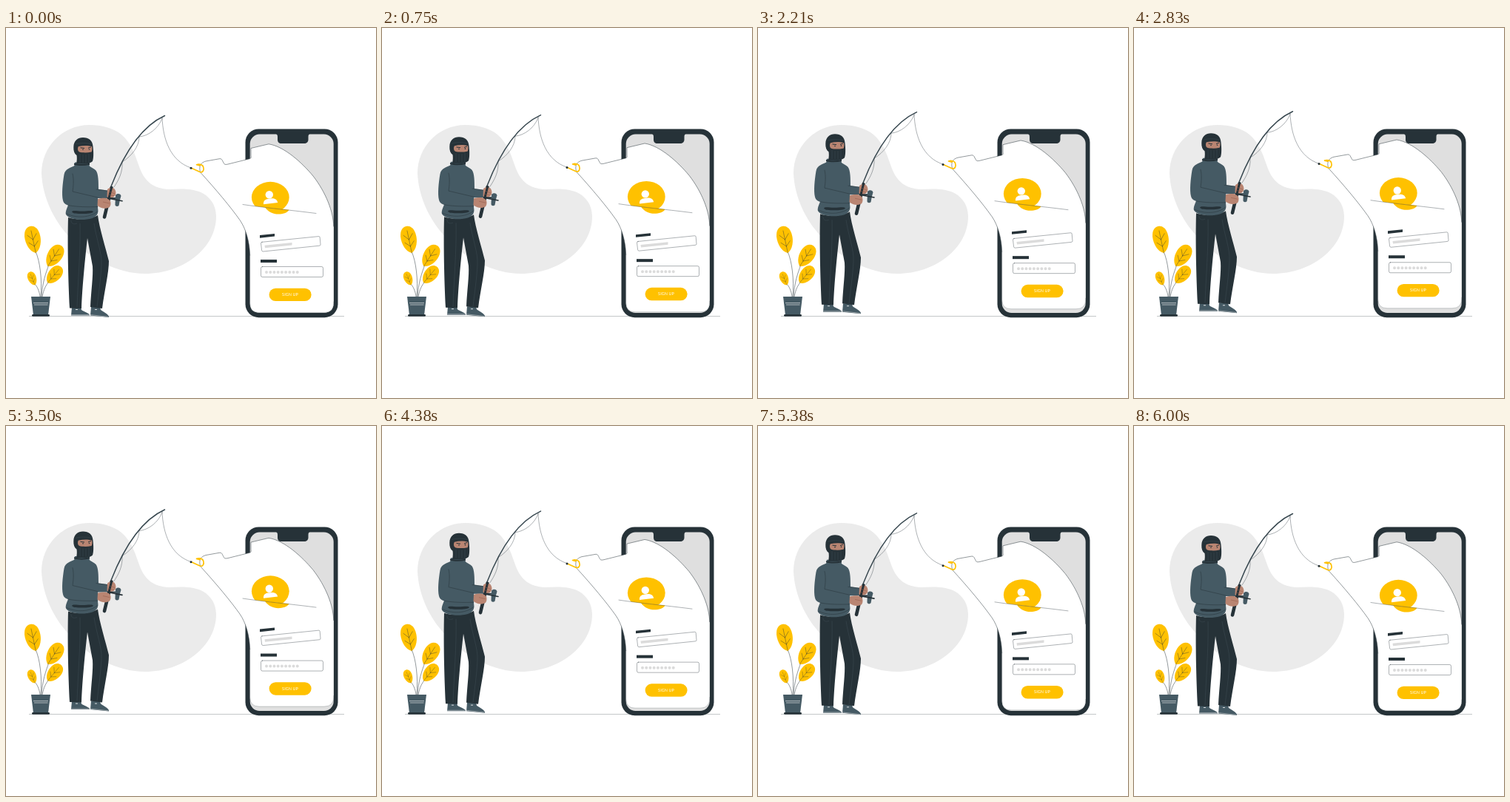
Write an HTML page that moves like this. It is 500 px wide and 500 px high and loops after 6.04 s.

```html
<!DOCTYPE html>
<html lang="en">
<head>
<meta charset="utf-8">
<title>Phishing</title>
<style>
  html, body { margin: 0; width: 100%; height: 100%; overflow: hidden; background: #fff; }
  svg { display: block; width: 100%; height: 100%; }
  .ink { fill: #263238; }
  .slate { fill: #455a64; }
  .gold { fill: #ffc100; }
  .skin { fill: #b98572; }
  .pale { fill: #dbdbdb; }
  .white { fill: #fff; }
  .thin { fill: none; stroke: #263238; stroke-width: .5; stroke-linecap: round; stroke-linejoin: round; }
  .fine { stroke-width: .38; }
  .rib { fill: none; stroke: #46555c; stroke-width: .4; }
  text { font: 5.4px Lato, Inter, sans-serif; letter-spacing: .1px; }
</style>
</head>
<body>
<svg viewBox="0 0 500 500">
  <defs>
    <g id="leaf">
      <path class="gold" d="M0 18C-7 15-11 4-10-6C-9-14-5-18 0-18S9-14 10-6C11 4 7 15 0 18Z"/>
      <path class="thin fine" d="M0 18V-12M0 9L-6 3M0 9L6 3M0 0L-6-7M0 0L6-7"/>
    </g>
    <clipPath id="upper"><path d="M320 200H420V250.500C380 245.500 350 243 320 238.500Z"/></clipPath>
  </defs>

  <path fill="#ebebeb" d="M113 131C75 131 48 162 48 196C49 225 62 258 88 285C112 311 150 332 188 332C240 332 284 297 284 255C284 233 268 219 245 218C236 217 228 218 220 218C200 217 188 208 181 190C175 174 171 157 156 144C145 135 129 131 113 131Z"/>
  <path d="M31 389.500H457" stroke="#b5babc" stroke-width=".8"/>

  <g id="plant">
    <path class="thin" d="M47 363C49 340 46 315 40 302M48 363C49 345 54 330 58 320M49 363C51 353 54 347 58 343M46 363C45 355 42 349 39 346"/>
    <use href="#leaf" transform="translate(36.5 286) rotate(-12) scale(1.04 1.02)"/>
    <use href="#leaf" transform="translate(65.5 308) rotate(33) scale(.98 .92)"/>
    <use href="#leaf" transform="translate(65.3 333.6) rotate(40) scale(.86 .78)"/>
    <use href="#leaf" transform="translate(35.5 338.5) rotate(-22) scale(.56 .53)"/>
    <path class="slate" d="M34 363H60L57 388H37Z"/>
    <path d="M37 371.600H57M38 374H56.500" stroke="#fff" stroke-width=".6"/>
    <rect class="ink" x="35" y="387" width="24" height="2.800" rx="1.400"/>
  </g>

  <g id="phone">
    <rect class="ink" x="323.500" y="136.500" width="125" height="254.700" rx="18"/>
    <rect x="329.700" y="143.600" width="113" height="241.400" rx="13" fill="#dfdfdf"/>
    <path class="ink" d="M363 142.500C366 143 367 144.500 367 147V151C367 154 369 156 372 156H403C406 156 408.500 154 408.500 151V147C408.500 144.500 409.500 143 412 142.500Z"/>
  </g>

  <g id="float">
    <g id="page">
      <path class="white" d="M262 191C261 184 266 181 270 180L288 176.800C292 176 292 179 294 182C295 185 297 184.600 300 184L329 176.800C332 176 331 174 331 172V162.500L355 156.800C376 160 400 182 415 200C432 222 442.500 248 442.700 268V372Q442.700 384.500 430 384.500H342Q329.700 384.500 329.700 372V307C329 288 324 271 316 259.500C304 242.500 284 218.500 263 195.500Z"/>
      <path class="thin" d="M329.700 307C329 288 324 271 316 259.500C304 242.500 284 218.500 263 195.500C262 193 261.500 190 262 188C262 184 266 181 270 180L288 176.800C292 176 292 179 294 182C295 185 297 184.600 300 184L329 176.800C332 176 331 174 331 172V162.500L355 156.800C376 160 400 182 415 200C432 222 442.500 248 442.700 268"/>
      <path class="thin" opacity=".45" d="M442.700 370V372Q442.700 384.500 430 384.500H342Q329.700 384.500 329.700 372V307"/>

      <ellipse class="gold" cx="357.300" cy="228.800" rx="25.400" ry="21" clip-path="url(#upper)"/>
      <path class="gold" d="M350 242.300L382.500 245.800C380 250 374 251.600 368 251.600C361 251.600 354 248.500 350 242.300Z"/>
      <path class="thin fine" d="M320 238.500C350 243 380 245.500 419 250.500"/>
      <circle class="white" cx="355.800" cy="225.200" r="5.200"/>
      <path class="white" d="M348 238.300C347.500 233 351 231.500 354 231C361 229.500 366 230.500 367.200 236Z"/>

      <path class="ink" d="M343 280L363 278V281.500L343 283.700Z"/>
      <path class="thin fine" d="M346 289.300L422.500 281.600Q424 281.500 424.200 283L425 292.500Q425 294 423.500 294.200L347.500 302Q345.800 302 345.600 300.500L344.500 291Q344.500 289.500 346 289.300Z"/>
      <path class="pale" d="M349.500 293.800L386.500 290V293.500L350 297.300Z"/>
      <rect class="ink" x="344" y="313" width="22" height="4"/>
      <rect class="thin fine" x="344.500" y="322.500" width="84" height="14" rx="2"/>
      <path d="M352 330H394" stroke="#dbdbdb" stroke-width="4" stroke-linecap="round" stroke-dasharray="0 5.220"/>
      <rect class="gold" x="355.600" y="351.700" width="57" height="17.400" rx="8.700"/>
      <text class="white" x="384" y="362" text-anchor="middle">SIGN UP</text>
    </g>

    <g id="man">
      <path class="slate" d="M89 377H101L102 381C106 384 111 384.500 113 387.500V388.500H88Z"/>
      <path class="slate" d="M115 377H127L128 381C132 384 137 386 139 389.500V391L114 388.500Z"/>
      <path d="M88 387.600H113M114 387.600L138.500 390.300" stroke="#aab2b5" stroke-width=".8"/>
      <path d="M94 380.500h3M120 380.500h3" stroke="#fff" stroke-width=".8"/>
      <path class="ink" d="M84 256C95 260 115 259 124 253C126 270 135 298 139 315C139 331 133 355 130 379L114 377C115 355 118 335 117 322L110 284C107 310 103 350 102 379L86 378.500C84 340 83 290 84 256Z"/>
      <path class="rib" d="M100 264C101 300 97 345 96 377M119 264C122 285 130 305 129 320C128 340 125 360 123 377M88 260C88 264 91 266 96 264"/>

      <path class="slate" d="M122 217.500L137 219.500V230H122Z"/>
      <path class="slate" d="M93 186C87 189 80 190 78.500 198C76.500 210 75 225 77 233C78 237 81 239 84 239.500C82 244 80 249 81 252C84 257 94 259 102 259C112 259 122 257 124 250C125 247 124 244 124 242V230L125 217.500C125 208 125 197 121.500 192.500C119 189.500 115 189 112 186Z"/>
      <path class="thin" d="M90 197C92 205 91 214 90 221L124 229M84 239.500C95 242 112 242 124 241.500M122 218L137 220M82 251C94 257 113 257 123.500 248"/>
      <path class="ink" d="M89 248.500C90 246 95 247.500 103 247.500S117 246 118 248.500C116 250.500 110 251 103 251S91 251 89 248.500Z"/>
      <path class="slate" d="M93 181.500H113L112.500 188H92Z"/>
      <path class="ink" d="M92 182.800C98 184.500 106 184.500 113 182.800V184.800C106 186.500 98 186.500 92 184.800Z"/>

      <path class="ink" d="M91.300 161C91.500 152 97 148 104 148C112 148 117 152 117.500 160C118.500 168 118.500 176 117 180C114 183 109 183.500 104 183.500H95C96 179 96 175 95.500 172C92.500 170 91 166 91.300 161Z"/>
      <path class="skin" d="M98 160C104 158.500 111 158.500 116 160C116.800 163 116.500 166 115.500 167.500C109 169 103 168.500 99 167.500C96.500 166 96.500 162 98 160Z"/>
      <path d="M100.500 161.800L106 162.500M111 162.300L115 160.800" stroke="#263238" stroke-width="1"/>
      <g class="ink"><circle cx="104" cy="164.300" r=".8"/><circle cx="112.500" cy="164" r=".8"/></g>
      <path class="rib" d="M100 170V182M104 171V182M108 171V182M112 170V182M94 157C99 155 110 155 116 157"/>

      <g id="rod">
        <path d="M214.500 118.500C187 131 162 163 142 214" fill="none" stroke="#37474f" stroke-width="1.500" stroke-linecap="round"/>
        <path class="thin fine" d="M211 122C206 136 192 146 180 147C180 160 170 173 157 181C158 195 152 206 146 215M211 121C212 150 222 180 250 189"/>
        <path d="M142.500 216L133 255.500" stroke="#263238" stroke-width="4.600" stroke-linecap="round"/>
        <path class="skin" d="M137 218C140 215 145 215 147 218C149 221 149 226 146 228C142 230 138 230 136.500 228Z"/>
        <path class="skin" d="M124 231C129 230 134 229 138 231C142 233 142.500 238 140 242C135 245 128 244 123.500 240Z"/>
        <path d="M142.500 216L139 230" stroke="#263238" stroke-width="3" stroke-linecap="round"/>
        <path d="M137 230H148" stroke="#263238" stroke-width="1.800"/>
        <path class="slate" d="M148 226C150 223 155 223.500 155.500 227L154 232L152.500 240C150.500 242 147 241 147.500 238Z"/>
        <path d="M140 230.500L157 233.800" stroke="#263238" stroke-width="1.600" stroke-linecap="round"/>
        <path d="M139.500 221L147 224M138 225L146 227M131 235L140 237" stroke="#8f5747" stroke-width=".5"/>
      </g>
    </g>

    <path d="M251 189.500L262 194.500C266 196 268 192 266.700 188C266 184.500 261 183.500 257.500 184.800L262 186" fill="none" stroke="#ffc100" stroke-width="1.700" stroke-linecap="round" stroke-linejoin="round"/>
    <circle class="ink" cx="250" cy="189.300" r="1.500"/>
  </g>
</svg>
<script>
  const PERIOD = 6040, RISE = 5.8;
  const float = document.getElementById("float");
  const start = performance.now();

  function draw(now) {
    const phase = Math.max(0, now - start) % PERIOD / PERIOD;
    const y = -RISE / 2 * (1 - Math.cos(2 * Math.PI * phase));
    float.setAttribute("transform", `translate(0 ${y.toFixed(3)})`);
    requestAnimationFrame(draw);
  }
  draw(start);
</script>
</body>
</html>
```
